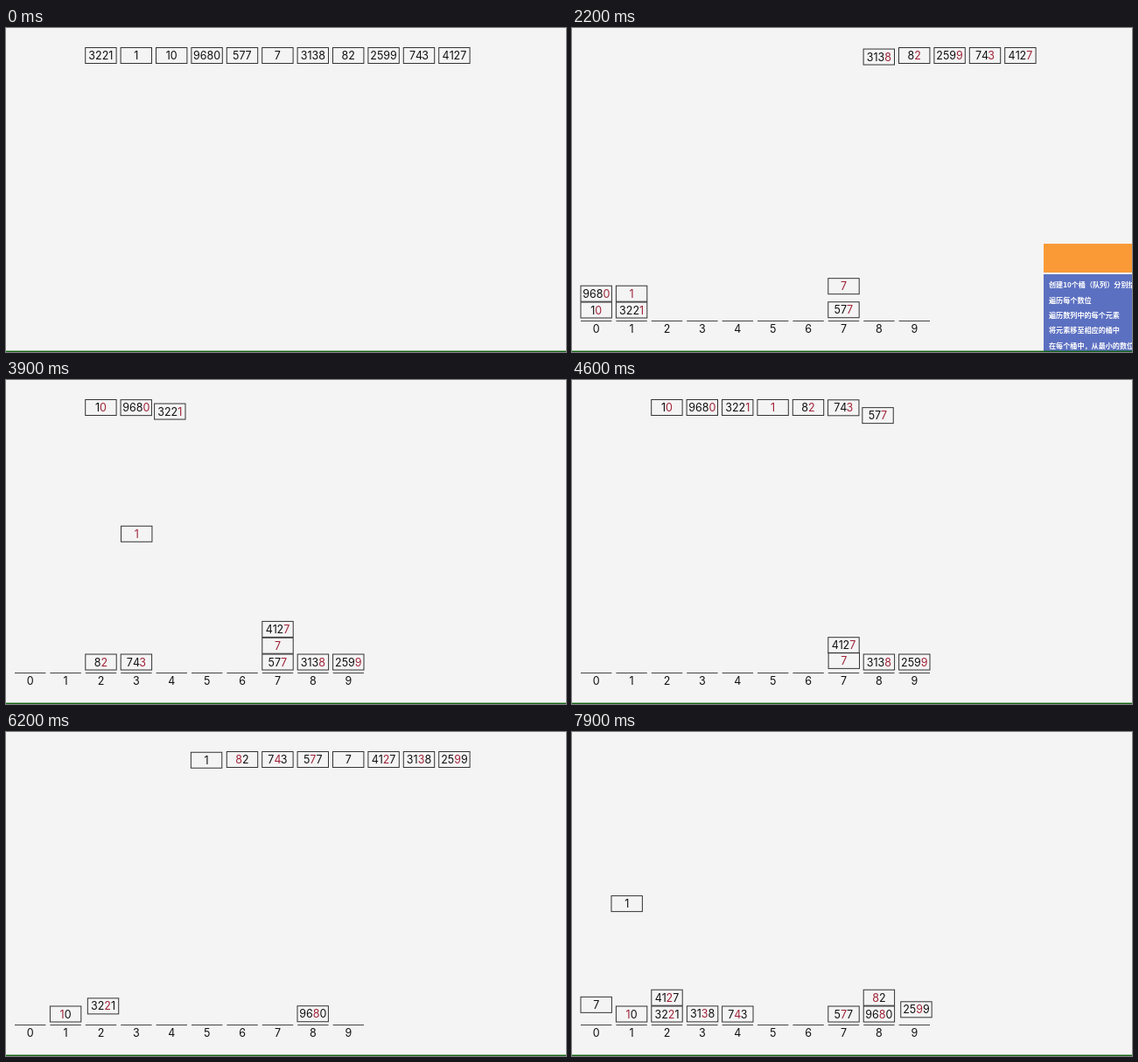
An HTML page with a canvas that plays this animation: 640x371 px, repeating every 8 s.

```html
<!DOCTYPE html>
<html lang="zh">
<head>
<meta charset="utf-8">
<title>Radix sort</title>
<style>
html, body { margin: 0; width: 100%; height: 100%; overflow: hidden; background: #f4f4f4; }
canvas { display: block; }
</style>
</head>
<body>
<canvas width="640" height="371"></canvas>
<script>
const ctx = document.querySelector('canvas').getContext('2d');
const LOOP = 8000, FIRST_STEP = 571, STEP = 200.3, MOVE = 250;
const PITCH = 40.4, BOX_W = 35.4, BOX_H = 18;
const FONT = 'Inter, "Liberation Sans", sans-serif';
const values = [3221, 1, 10, 9680, 577, 7, 3138, 82, 2599, 743, 4127];
const codeLines = ['创建10个桶（队列）分别给各个数位', '遍历每个数位', '遍历数列中的每个元素',
  '将元素移至相应的桶中', '在每个桶中，从最小的数位开始'];

const clamp = x => Math.max(0, Math.min(1, x));
const ease = u => u < 0.5 ? 4 * u ** 3 : 1 - 4 * (1 - u) ** 3;
const mix = (a, b, p) => a + (b - a) * p;
const slot = i => ({ x: 90.7 + PITCH * i, y: 22.5 });
const bucketX = j => 10 + PITCH * j;

// Each step stores where every value is heading and which digit is highlighted.
function buildSteps() {
  const steps = [];
  const place = {};
  values.forEach((v, i) => place[v] = slot(i));
  let order = values.slice(), digit = -1;
  const record = () => steps.push({ place: { ...place }, digit });
  const stack = (bucket, j) => bucket.forEach((v, n) =>
    place[v] = { x: bucketX(j), y: 314 - 18.8 * n });

  record();
  for (digit = 0; digit < 2; digit++) {
    record();
    const buckets = Array.from({ length: 10 }, () => []);
    for (const v of order) {
      const j = Math.floor(v / 10 ** digit) % 10;
      buckets[j].push(v);
      stack(buckets[j], j);
      record();
    }
    order = [];
    buckets.forEach((bucket, j) => {
      while (bucket.length) {
        const v = bucket.shift();
        place[v] = slot(order.length);
        order.push(v);
        stack(bucket, j);
        record();
      }
    });
  }
  return steps;
}
const steps = buildSteps();

// A new step interrupts running moves and restarts them from where they are.
function positionOf(v, t) {
  let { x, y } = steps[0].place[v];
  for (let k = 0; k < steps.length; k++) {
    const elapsed = t - FIRST_STEP - k * STEP;
    if (elapsed <= 0) break;
    const p = ease(clamp(Math.min(elapsed, STEP) / MOVE));
    const to = steps[k].place[v];
    x = mix(x, to.x, p);
    y = mix(y, to.y, p);
  }
  return { x, y };
}

function drawValue(v, t, digit) {
  const { x, y } = positionOf(v, t);
  const text = String(v);
  ctx.strokeStyle = '#333';
  ctx.lineWidth = 1;
  ctx.strokeRect(x, y, BOX_W, BOX_H);
  ctx.font = '12.5px ' + FONT;
  ctx.textAlign = 'left';
  const left = x + (BOX_W - ctx.measureText(text).width) / 2;
  [...text].forEach((c, i) => {
    ctx.fillStyle = i === text.length - 1 - digit && digit >= 0 ? '#a02338' : '#111';
    ctx.fillText(c, left + ctx.measureText(text.slice(0, i)).width, y + 13.6);
  });
}

function drawBuckets(alpha) {
  ctx.globalAlpha = alpha;
  ctx.font = '12.5px ' + FONT;
  ctx.textAlign = 'center';
  for (let j = 0; j < 10; j++) {
    const x = bucketX(j);
    ctx.fillStyle = '#444';
    ctx.fillRect(x, 335, BOX_W, 1);
    ctx.fillStyle = '#111';
    ctx.fillText(j, x + BOX_W / 2, 349.3);
  }
  ctx.globalAlpha = 1;
}

function drawPanels(t) {
  const left = (open, close) =>
    640 - 101 * ease(clamp((t - open) / 250)) + 101 * ease(clamp((t - close) / 250));
  ctx.fillStyle = '#fa9a37';
  ctx.fillRect(left(480, 3300), 247, 101, 33);
  const x = left(480, 2750);
  ctx.fillStyle = '#5c70c1';
  ctx.fillRect(x, 282, 101, 88);
  ctx.fillStyle = '#fff';
  ctx.font = 'bold 8.1px "Noto Sans CJK SC", "Noto Sans CJK", sans-serif';
  ctx.textAlign = 'left';
  codeLines.forEach((line, i) => ctx.fillText(line, x + 6, 297.3 + 17.3 * i));
}

function draw(t) {
  ctx.fillStyle = '#f4f4f4';
  ctx.fillRect(0, 0, 640, 371);
  drawBuckets(ease(clamp((t - FIRST_STEP) / MOVE)));
  const current = Math.floor((t - FIRST_STEP) / STEP);
  const { digit } = steps[Math.max(0, current)];
  values.forEach(v => drawValue(v, t, digit));
  drawPanels(t);
  ctx.fillStyle = '#126312';
  ctx.fillRect(0, 369.6, 640, 1.4);
}

const start = performance.now();
function tick() {
  draw((performance.now() - start) % LOOP);
  requestAnimationFrame(tick);
}
tick();
</script>
</body>
</html>
```
